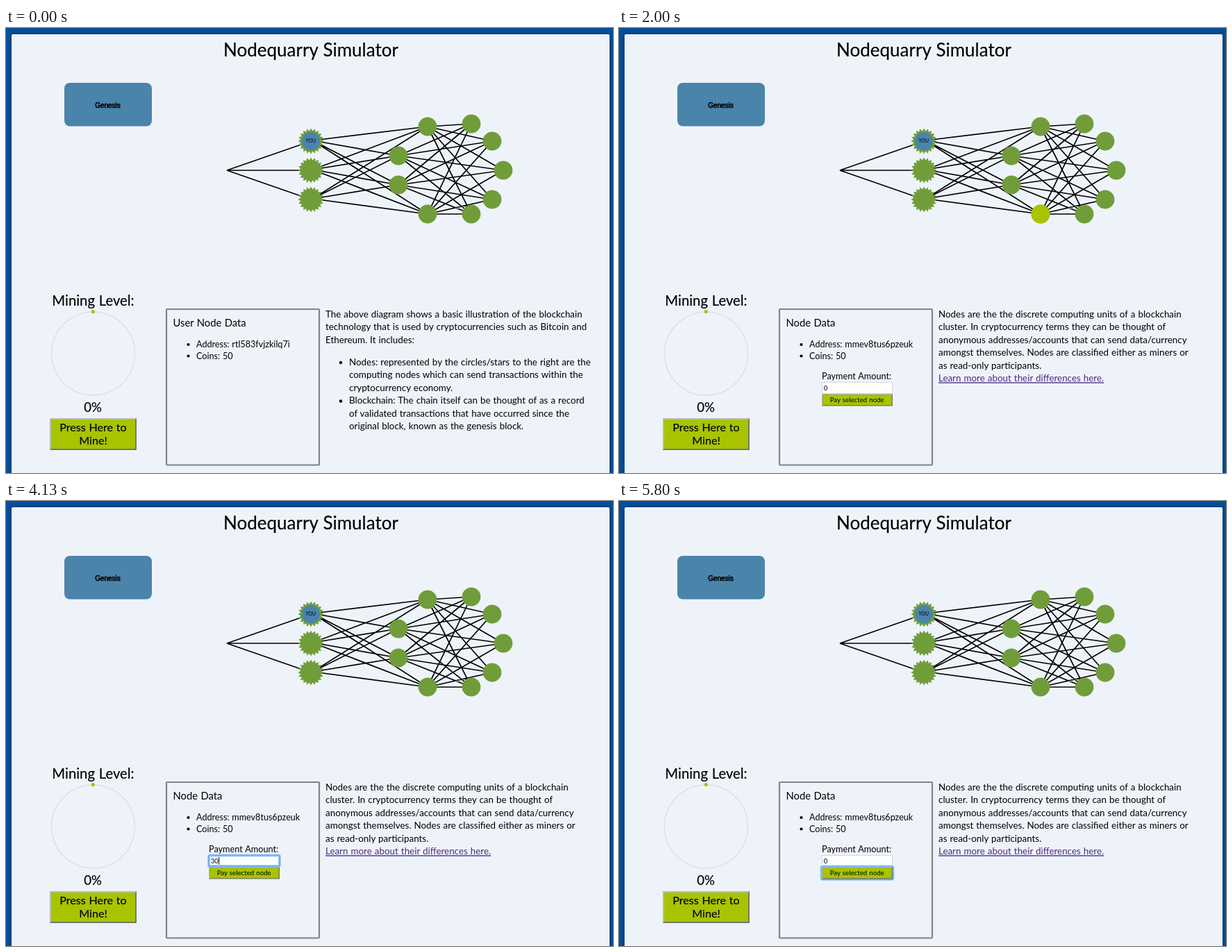
Write an HTML page that moves like this. It is 874 px wide and 641 px high and loops after 5.87 s.

```html
<!DOCTYPE html>
<html lang="en">
<head>
<meta charset="utf-8">
<title>Nodequarry Simulator</title>
<style>
  html, body { margin: 0; width: 100%; height: 100%; overflow: hidden; background: #05509a; }
  svg { display: block; width: 874px; height: 641px; font-family: Lato, "Open Sans", sans-serif; }
  text { word-spacing: .6px; white-space: pre; }
  .head { stroke: #000; stroke-width: .15px; }
  .mid { text-anchor: middle; }
  .link { fill: #4b2a80; text-decoration: underline; }
  .genesis { font-family: "Liberation Sans", Arial, sans-serif; stroke: #000; stroke-width: .6px; }
  .active { fill: #fff; font-weight: bold; }
  .page { filter: drop-shadow(0 0 3px #0006); }
  .ring { fill: none; stroke: #6cb0f5; stroke-width: 2; }
  .glow { fill: none; stroke: #a9d0f7; stroke-width: 4; }
</style>
</head>
<body>
<svg id="stage" viewBox="0 0 874 641"></svg>
<script>
const LOOP = 5870, GREEN = '#709d3a', LIME = '#a8c400', BLUE = '#4a84ab';

// Moments of the user's actions, in ms
const T = { hover: 1600, select: 1800, leave: 2300, focus: 2600, erase: 3300,
            three: 3500, thirty: 3720, payHover: 4650, pay: 4850, payLeave: 5400 };

const text = (x, y, size, str, cls = '', id = '') =>
  `<text x="${x}" y="${y}" font-size="${size}" class="${cls}" id="${id}">${str}</text>`;
const rect = (x, y, w, h, fill, extra = '') =>
  `<rect x="${x}" y="${y}" width="${w}" height="${h}" fill="${fill}" ${extra}/>`;
const circle = (x, y, r, fill, extra = '') =>
  `<circle cx="${x}" cy="${y}" r="${r}" fill="${fill}" ${extra}/>`;
const lines = (x, y, rows) =>
  rows.map((row, i) => text(x, y + i * 18.45, 13.4, row)).join('');
const bevel = (x, y, w, h, b) =>
  rect(x, y, w, h, '#73776b') +
  `<path d="M${x} ${y}h${w}l${-b} ${b}H${x + b}V${y + h - b}l${-b} ${b}z" fill="#b9bdb0"/>` +
  rect(x + b, y + b, w - 2 * b, h - 2 * b, LIME);
const focusRing = (id, x, y, w, h) =>
  `<g id="${id}">${rect(x, y, w, h, 'none', 'rx="2" class="glow"')}${rect(x, y, w, h, 'none', 'rx="1" class="ring"')}</g>`;

// Network
const miners = [[439, 163], [439, 205], [439, 247]];
const outlets = miners.map(([x, y]) => [x + 2.5, y - 1]);
const relays = [[607, 142], [565, 184], [565, 226], [607, 268]];
const outer = [[670, 138], [700, 163], [716, 205], [700, 247], [670, 268]];
const SPIKES = 20;

const link = (from, to) => from.flatMap(a => to.map(b => `M${a}L${b}`)).join('');
const star = ([x, y]) => {
  const points = Array.from({ length: 2 * SPIKES }, (_, i) => {
    const r = i % 2 ? 14.8 : 18.6, a = i * Math.PI / SPIKES - Math.PI / 2;
    return [x + r * Math.cos(a), y + r * Math.sin(a)].map(v => v.toFixed(2));
  });
  return `<polygon points="${points.join(' ')}" fill="${GREEN}"/>`;
};
const network =
  `<path d="${link([[318, 205]], miners)}${link(outlets, relays)}${link(relays, outer)}" stroke="#000" stroke-width="1.7" fill="none"/>` +
  miners.map(star).join('') +
  [...relays, ...outer].map(([x, y]) => circle(x, y, 13.4, GREEN)).join('') +
  circle(607, 268, 13.4, LIME, 'id="hot"') +
  circle(439, 163, 13, BLUE) + text(438.8, 165.3, 6.8, 'YOU', 'mid');

const mining =
  text(125.5, 399.5, 20.3, 'Mining Level:', 'head mid') +
  circle(125.5, 469, 60, 'none', 'stroke="#dcdfe3" stroke-width="1.4"') +
  circle(125.3, 408.6, 2.6, LIME) +
  text(125, 553, 18.6, '0%', 'head mid') +
  bevel(63, 562, 125, 46, 2) +
  text(125.5, 581, 16.1, 'Press Here to', 'head mid') +
  text(125.5, 600, 16.1, 'Mine!', 'head mid');

const nodeData = (title, address) =>
  text(240.5, 430, 14.8, title) +
  text(274, 460, 12.6, 'Address: ' + address) +
  text(274, 476.5, 12.6, 'Coins: 50') +
  circle(262.5, 456, 2.1, '#000') + circle(262.5, 472.5, 2.1, '#000');

const intro = nodeData('User Node Data', 'rtl583fvjzkilq7i') +
  lines(460, 417, [
    'The above diagram shows a basic illustration of the blockchain',
    'technology that is used by cryptocurrencies such as Bitcoin and',
    'Ethereum. It includes:']) +
  circle(482, 482, 2.2, '#000') + circle(482, 537.5, 2.2, '#000') +
  lines(494, 486, [
    'Nodes: represented by the circles/stars to the right are the',
    'computing nodes which can send transactions within the',
    'cryptocurrency economy.',
    'Blockchain: The chain itself can be thought of as a record',
    'of validated transactions that have occurred since the',
    'original block, known as the genesis block.']);

const selected = nodeData('Node Data', 'mmev8tus6pzeuk') +
  text(292, 506, 12.7, 'Payment Amount:') +
  rect(292.5, 510.5, 101, 16, '#fff', 'stroke="#d3d7dc"') +
  focusRing('inputRing', 292, 510.5, 102, 15.5) +
  text(294.7, 522, 9.6, '0', '', 'amount') +
  rect(300.5, 513, 1, 10.5, '#000', 'id="caret"') +
  focusRing('payRing', 291.5, 526.5, 103, 18.5) +
  bevel(292, 527, 102, 17.5, 1.3) +
  text(342.7, 538.8, 9.7, 'Pay selected node', 'mid', 'payLabel') +
  lines(460, 417, [
    'Nodes are the the discrete computing units of a blockchain',
    'cluster. In cryptocurrency terms they can be thought of',
    'anonymous addresses/accounts that can send data/currency',
    'amongst themselves. Nodes are classified either as miners or',
    'as read-only participants.']) +
  text(460, 509.3, 13.4, 'Learn more about their differences here.', 'link');

const $ = id => document.getElementById(id);
$('stage').innerHTML =
  rect(0, 0, 874, 641, '#05509a') +
  rect(8, 9, 861, 650, '#eef3fa', 'rx="2" class="page"') +
  text(439, 40.5, 26, 'Nodequarry Simulator', 'head mid') +
  rect(84, 79, 126, 62.5, BLUE, 'rx="8"') +
  text(146.5, 114.5, 10, 'Genesis', 'genesis mid') +
  network + mining +
  rect(231, 405, 220, 224.5, 'none', 'stroke="#80848a" stroke-width="2.2" rx="1"') +
  `<g id="intro">${intro}</g><g id="selected">${selected}</g>`;

const show = (id, on) => $(id).setAttribute('visibility', on ? 'inherit' : 'hidden');

function draw(now) {
  const t = now % LOOP;
  const within = (a, b) => t >= a && t < b;
  const typing = within(T.focus, T.pay);
  const amount = within(T.erase, T.three) ? '' : within(T.three, T.thirty) ? '3'
    : within(T.thirty, T.pay) ? '30' : '0';

  show('intro', t < T.select);
  show('selected', t >= T.select);
  show('hot', within(T.hover, T.leave));
  show('inputRing', typing);
  show('caret', typing && (t - T.focus) % 1000 < 600);
  show('payRing', t >= T.pay);
  $('amount').textContent = amount;
  $('caret').setAttribute('x', 295 + amount.length * 5.6);
  $('payLabel').setAttribute('class', within(T.payHover, T.payLeave) ? 'mid active' : 'mid');
  requestAnimationFrame(() => draw(performance.now() - start));
}
const start = performance.now();
draw(0);
</script>
</body>
</html>
```
